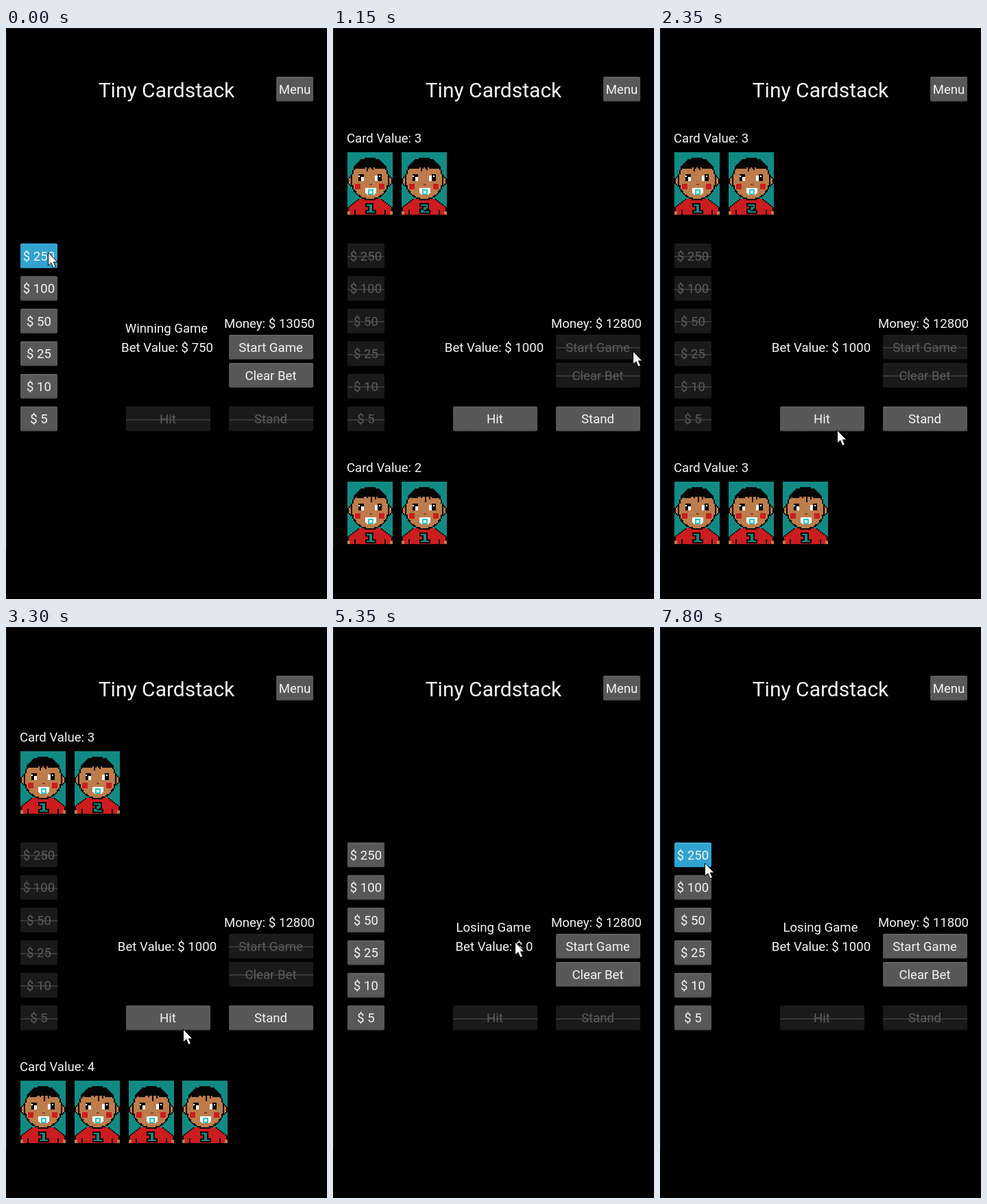
Animation, 468 px wide and 832 px high, one loop 8 s. Source, as an HTML page with a canvas:

```html
<!DOCTYPE html>
<html lang="en">
<head>
<meta charset="utf-8">
<title>Tiny Cardstack</title>
<style>
html, body { margin: 0; width: 100%; height: 100%; overflow: hidden; background: #000; }
canvas { display: block; }
</style>
</head>
<body>
<canvas id="stage" width="468" height="832"></canvas>
<script>
const ctx = document.getElementById('stage').getContext('2d');
const LOOP = 8000, STEP = 50;
const TEAL = '#128a84', SKIN = '#bd7c4b', RED = '#cb1d1f', BLACK = '#050505';

// Pointer tip: time, x, y
const path = [
  [0, 61, 327], [100, 61, 327], [700, 437, 471], [1150, 437, 471],
  [1800, 258, 586], [4600, 258, 586], [4700, 257, 584], [4950, 257, 584],
  [5100, 267, 472], [5250, 267, 472], [5350, 265, 459], [5750, 410, 430],
  [6250, 410, 430], [6850, 65, 344], [LOOP, 65, 344]
];
const hitPresses = [[2100, 2350], [2850, 3100], [3750, 3950]];
const within = (t, a, b) => t >= a && t < b;

function rect(color, x, y, w, h) {
  ctx.fillStyle = color;
  ctx.fillRect(x, y, w, h);
}

function text(str, x, baseline, { size = 18.6, align = 'center', color = '#f4f4f4' } = {}) {
  ctx.font = `${size}px Roboto, sans-serif`;
  ctx.textAlign = align;
  ctx.fillStyle = color;
  ctx.fillText(str, x, baseline);
}

function button(label, x, y, w, { pressed = false, disabled = false } = {}) {
  const h = 36;
  const [top, mid, bottom] = pressed ? ['#3fabd5', '#32a3cf', '#2b98c3']
    : disabled ? ['#1d1d1d', '#1a1a1a', '#171717'] : ['#666', '#585858', '#4d4d4d'];
  const fill = ctx.createLinearGradient(0, y, 0, y + h);
  fill.addColorStop(0, top);
  fill.addColorStop(0.08, mid);
  fill.addColorStop(0.92, mid);
  fill.addColorStop(1, bottom);
  ctx.fillStyle = fill;
  ctx.beginPath();
  ctx.roundRect(x, y, w, h, 2);
  ctx.fill();
  if (disabled) rect('#383838', x, Math.round(y + h / 2), w, 2);
  text(label, x + w / 2 - (w > 100 ? 0.5 : 0), y + h / 2 + 6.8, { color: disabled ? '#5c5c5c' : '#f4f4f4' });
}

// Ellipse built from whole rows, so that the edge stays stepped
function blob(color, cx, cy, rx, ry, from = cy - ry, to = cy + ry) {
  for (let y = Math.ceil(from); y < to; y++) {
    const d = (y + 0.5 - cy) / ry;
    if (Math.abs(d) >= 1) continue;
    const half = Math.round(rx * Math.sqrt(1 - d * d));
    rect(color, cx - half, y, half * 2, 1);
  }
}

const digits = {
  1: [[14, 38, 3, 1], [16, 38, 2, 6], [14, 43, 6, 1]],
  2: [[14, 38, 5, 1], [18, 38, 1, 3], [16, 40, 2, 2], [14, 42, 2, 2], [14, 43, 6, 1]]
};

function card(x, y, value, cap) {
  ctx.save();
  ctx.beginPath();
  ctx.rect(x, y, 66, 91);
  ctx.clip();
  ctx.translate(x, y);
  ctx.scale(2, 2);
  rect(TEAL, 0, 0, 33, 46);

  for (const ear of [3, 30]) {
    blob(BLACK, ear, 21, 3, 4);
    blob(SKIN, ear, 21, 2, 3);
  }
  // Shirt and hands
  for (let row = 34; row < 46; row++) {
    const half = Math.min(16.5, 9 + (row - 34) * 1.3);
    rect(BLACK, 16.5 - half, row, half * 2, 1);
    rect(RED, 17.5 - half, row, half * 2 - 2, 1);
  }
  rect(BLACK, 5, 42, 1, 4);
  rect(BLACK, 27, 42, 1, 4);
  for (const hand of [0, 31]) rect(SKIN, hand, 43, 2, 3);

  blob(BLACK, 16.5, 20, 14, 15);
  blob(SKIN, 16.5, 20, 13, 14);
  blob(BLACK, 16.5, 13, 12, 9, 4, 11);
  rect(BLACK, cap ? 5 : 7, 10, cap ? 8 : 5, 2);
  rect(BLACK, cap ? 20 : 22, 10, cap ? 7 : 5, 2);
  for (const [sx, len] of cap ? [[14, 4], [15, 2], [18, 3], [17, 2]] : [[14, 2], [17, 5], [20, 3]])
    rect(BLACK, sx, 10, 1, len);

  // Eyes, nose and cheeks
  rect(BLACK, 8, 16, 4, 5);
  rect('#fff', 10, 18, 2, 3);
  rect('#fff', 8, 17, 1, 1);
  rect('#fff', 20, 17, 2, 4);
  rect(BLACK, 22, 16, 3, 5);
  rect('#fff', 23, 17, 1, 1);
  rect('#8e3b2a', 16, 23, 2, 1);
  rect(RED, 5.5, 23, 4, 4);
  rect(RED, 23, 23, 4, 4);

  // Pacifier
  rect('#fff', 13, 26, 8, 4);
  rect('#fff', 14, 30, 6, 1);
  rect('#28c9c9', 15, 27, 4, 4);
  rect('#e4fbfb', 16, 28, 2, 2);

  for (const [dx, dy, w, h] of digits[value]) rect(BLACK, dx - 1, dy - 1, w + 2, h + 2);
  for (const part of digits[value]) rect(TEAL, ...part);
  ctx.restore();
}

const cardX = i => 21 + Math.round(i * 78.8);

function pointer(t) {
  const i = path.findIndex(p => p[0] > t);
  const [t0, x0, y0] = path[i - 1], [t1, x1, y1] = path[i];
  const p = (t - t0) / (t1 - t0), e = p * p * (3 - 2 * p);
  ctx.save();
  ctx.translate(Math.round(x0 + (x1 - x0) * e), Math.round(y0 + (y1 - y0) * e));
  const arrow = new Path2D('M.5 0V19L4.8 15L8 22.5L11.5 21L8.3 14H14Z');
  ctx.fillStyle = '#fff';
  ctx.strokeStyle = '#000';
  ctx.lineWidth = 1;
  ctx.fill(arrow);
  ctx.stroke(arrow);
  ctx.restore();
}

function draw(t) {
  const playing = within(t, 1150, 3950);
  const clicks = t < 7350 ? 0 : Math.min(4, 1 + Math.floor((t - 7350) / 150));
  const bet = t < 100 ? 750 : t < 4950 ? 1000 : clicks * 250;
  const money = t < 100 ? 13050 : 12800 - clicks * 250;

  rect('#000', 0, 0, 468, 832);
  rect('#1c1c1c', 0, 0, 468, 1);
  rect('#1c1c1c', 0, 0, 1, 760);
  text('Tiny Cardstack', 234, 101, { size: 30 });
  button('Menu', 394, 71, 54);

  [250, 100, 50, 25, 10, 5].forEach((chip, i) => button('$ ' + chip, 21, 314 + i * 47.5, 54, {
    disabled: playing,
    pressed: i === 0 && (t < 100 || t >= 7150)
  }));
  button('Start Game', 325, 447, 123, { disabled: playing, pressed: within(t, 900, 1150) });
  button('Clear Bet', 325, 488, 123, { disabled: playing });
  button('Hit', 175, 551.5, 123, {
    disabled: !playing,
    pressed: hitPresses.some(([a, b]) => playing && within(t, a, b))
  });
  button('Stand', 325, 551.5, 123, { disabled: !playing });

  text('Money: $ ' + money, 384, 436.5);
  text('Bet Value: $ ' + bet, 235, 471.5);
  if (!playing) text(t < 1150 ? 'Winning Game' : 'Losing Game', 234, 444);

  if (within(t, 1150, 4950)) {
    const hand = [1, 1, 1, 1, 2].slice(0, 2 + hitPresses.filter(p => t >= p[1]).length);
    [1, 2].forEach((value, i) => card(cardX(i), 181, value, true));
    hand.forEach((value, i) => card(cardX(i), 661, value, value === 2));
    if (playing) {
      text('Card Value: 3', 20, 166.5, { align: 'left' });
      text('Card Value: ' + hand.reduce((a, b) => a + b), 20, 646.5, { align: 'left' });
    }
  }
  pointer(t);
}

const start = performance.now();
function tick() {
  const t = (performance.now() - start) % LOOP;
  draw(Math.floor(t / STEP) * STEP);
  requestAnimationFrame(tick);
}
tick();
</script>
</body>
</html>
```
